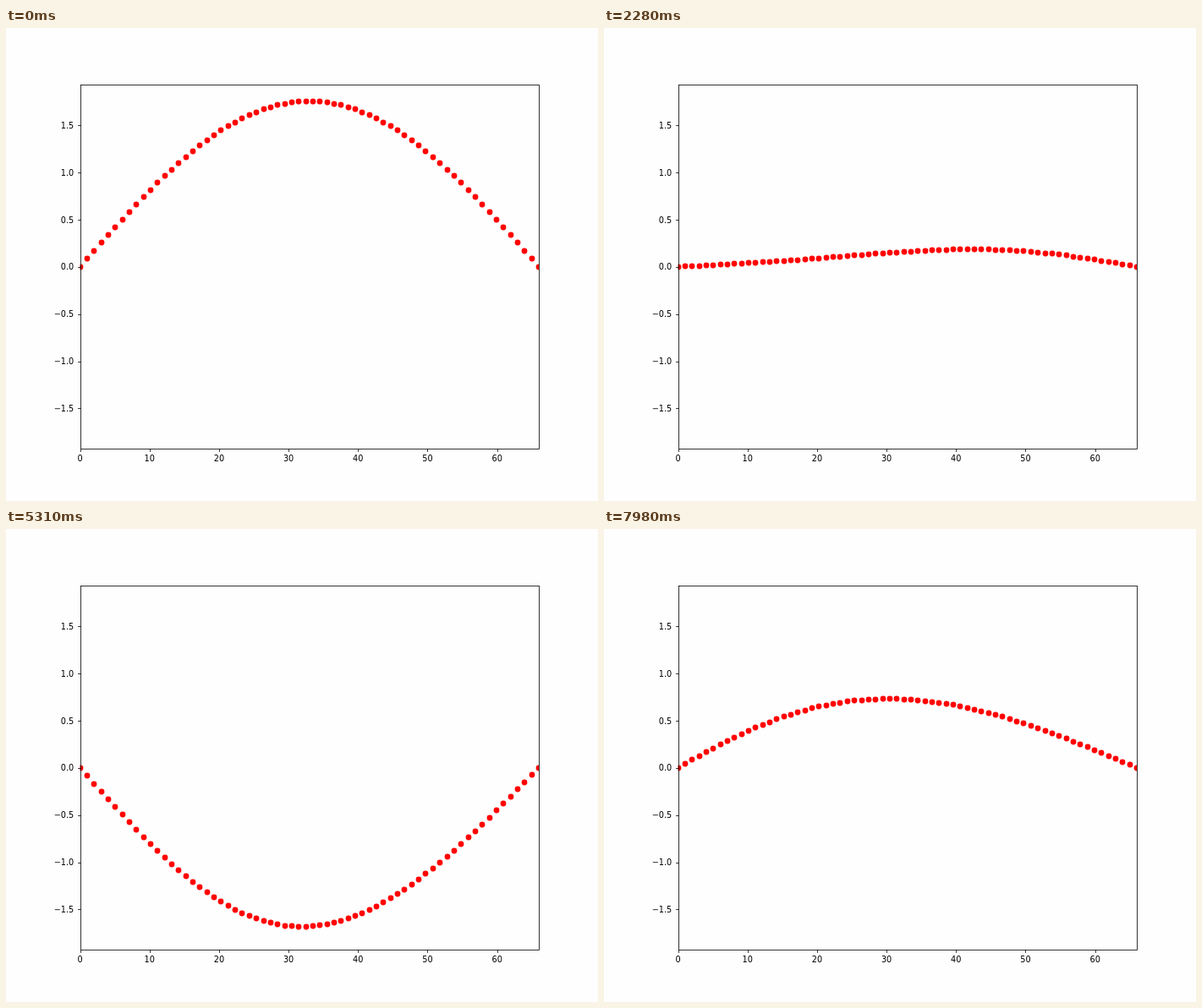
An HTML page for the animation above (8000 ms loop, 700x560 px).

```html
<!DOCTYPE html>
<html lang="en">
<head>
<meta charset="utf-8">
<title>Nonlinear string</title>
<style>
html, body { margin: 0; width: 100%; height: 100%; overflow: hidden; background: #fefefe; }
svg { display: block; width: 700px; height: 560px; }
text { font: 9.72px "DejaVu Sans", sans-serif; fill: #000; }
.line { fill: none; stroke: #000; stroke-width: .8; }
</style>
</head>
<body>
<svg viewBox="0 0 700 560">
  <clipPath id="plot"><rect x="87.5" y="67.2" width="542.5" height="431.2"/></clipPath>
  <g id="dots" clip-path="url(#plot)" fill="#f00"></g>
  <g id="axes"><rect class="line" x="88.5" y="67.5" width="542" height="431"/></g>
</svg>
<script>
const LOOP = 8000, STEP = 30;
const LEFT = 87.5, WIDTH = 542.5, MID = 282.8, HALF = 215.6;
const N = 65;                          // springs in the chain
const AMP = 10 * Math.sqrt(2 / N);
const ALPHA = 1.15, DT = 0.4;

const toX = v => LEFT + WIDTH * v / 66;
const toY = v => MID - HALF * v / (1.1 * AMP);

function add(parent, tag, attrs, text) {
  const el = document.createElementNS("http://www.w3.org/2000/svg", tag);
  for (const key in attrs) el.setAttribute(key, attrs[key]);
  if (text) el.textContent = text;
  return parent.appendChild(el);
}

// Chain of masses with quadratic springs, fixed at both ends.
function simulate(count) {
  const q = Array.from({ length: N + 1 }, (_, i) => AMP * Math.sin(Math.PI * i / N));
  const p = new Array(N + 1).fill(0);
  const pull = d => d + ALPHA * d * d;
  const states = [];
  for (let s = 0; s < count; s++) {
    states.push(q.slice());
    for (let i = 1; i < N; i++) p[i] += DT * (pull(q[i + 1] - q[i]) - pull(q[i] - q[i - 1]));
    for (let i = 1; i < N; i++) q[i] += DT * p[i];
  }
  return states;
}

const axes = document.getElementById("axes");
for (let v = 0; v <= 60; v += 10) {
  const x = toX(v), line = Math.floor(x + 0.5) + 0.5;
  add(axes, "path", { class: "line", d: `M${line} 498.5v3.4` });
  add(axes, "text", { x, y: 513, "text-anchor": "middle" }, String(v));
}
for (let v = -1.5; v <= 1.5; v += 0.5) {
  const y = toY(v), line = Math.floor(y + 0.5) + 0.5;
  add(axes, "path", { class: "line", d: `M88.5 ${line}h-3.4` });
  add(axes, "text", { x: 80.3, y: y + 3.6, "text-anchor": "end" }, v.toFixed(1).replace("-", "\u2212"));
}

const group = document.getElementById("dots");
const dots = Array.from({ length: N + 1 }, (_, i) =>
  add(group, "circle", { cx: Math.round(LEFT + WIDTH * i / N), r: 3.4 }));
const states = simulate(Math.ceil(LOOP / STEP));

function draw(time) {
  const state = states[Math.floor(time % LOOP / STEP)];
  dots.forEach((dot, i) => dot.setAttribute("cy", Math.round(toY(state[i]))));
}

const start = performance.now();
function tick() {
  draw(performance.now() - start);
  requestAnimationFrame(tick);
}
draw(0);
requestAnimationFrame(tick);
</script>
</body>
</html>
```
